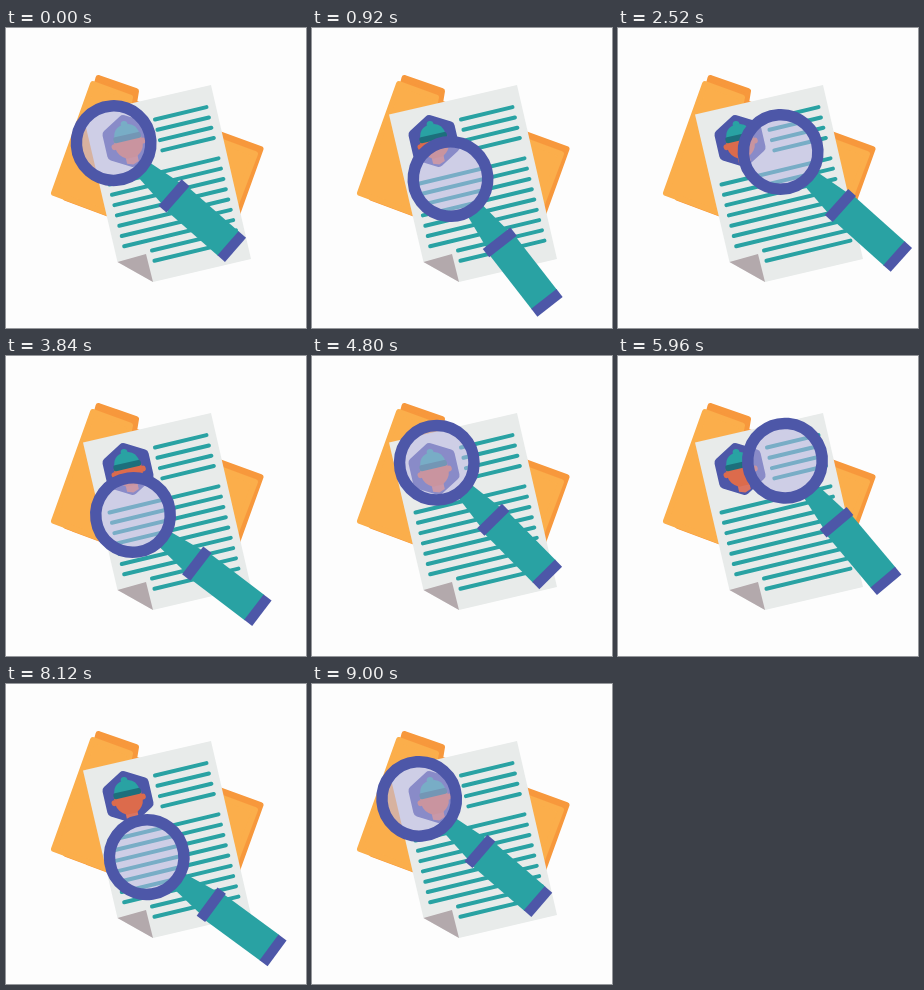
These frames come from a looping animation (300x300 px, 9.04 s). An HTML page:

```html
<!DOCTYPE html>
<html lang="en">
<head>
<meta charset="utf-8">
<title>Document search</title>
<style>
  html, body { margin: 0; height: 100%; overflow: hidden; background: #fdfdfd; }
  svg { display: block; width: 100vw; height: 100vh; }
  .navy { fill: #4d57a8; }
  .teal { fill: #29a2a3; }
  .round { stroke-width: 6; stroke-linejoin: round; }
</style>
</head>
<body>
<svg viewBox="0 0 300 300">
  <g class="round">
    <path d="M92.5 50 130 63 128 75 254.500 121 216 228 60 170Z" fill="#f7983c" stroke="#f7983c"/>
    <path d="M87 56 124 69.500 122 79 249 126 211 226 48 165Z" fill="#fbae4b" stroke="#fbae4b"/>
  </g>

  <path d="M77 86.500 205 57 245 231 147 254 111.500 234Z" fill="#e8ebea"/>
  <path d="M111.500 234 140 226 147 254Z" fill="#b3a9ac"/>
  <path id="lines" fill="none" stroke="#29a2a3" stroke-width="4" stroke-linecap="round"/>

  <g transform="translate(122 113) rotate(-13)">
    <path id="badge" class="navy" stroke="#4d57a8" stroke-width="10" stroke-linejoin="round"/>
    <path d="M-6 8H6V22L0 24-6 22Z" fill="#dc7460"/>
    <g fill="#dc6b4c">
      <circle cx="-14.500" cy="3" r="3"/>
      <circle cx="14.500" cy="3" r="3"/>
      <path d="M-14-3H14V5Q13 13 5 17H-5Q-13 13-14 5Z"/>
    </g>
    <circle class="teal" cy="-17" r="3.500"/>
    <path class="teal" d="M-13-4Q-12-17 0-17T13-4Z"/>
    <rect x="-14" y="-6.500" width="28" height="6" rx="2" fill="#1d6f7c"/>
  </g>

  <g id="glass">
    <path class="teal" d="M38-9 77-14V14L38 9Z"/>
    <path class="teal" d="M84-16H153V16H84Z"/>
    <path class="navy" d="M75-17.500H85.500V17.500H75Z"/>
    <path class="navy" d="M152-16H162V16H152Z"/>
    <circle r="34" fill="#bab7e3" fill-opacity=".55"/>
    <circle r="37.250" fill="none" stroke="#4d57a8" stroke-width="11.500"/>
  </g>
</svg>
<script>
  const LAP = 4520, STEP = 40;
  const byId = id => document.getElementById(id);

  // Text rows run parallel to the tilted top edge of the page.
  const rows = (count, x, y, width) => Array.from({ length: count },
    (_, i) => `M${x + 2.45 * i} ${y + 10.3 * i}l${width} ${-0.24 * width}`).join('');
  byId('lines').setAttribute('d',
    rows(4, 149, 91.5, 51.5) + rows(7, 103.5, 156.5, 109) + rows(2, 146, 222.5, 84));

  const corners = Array.from({ length: 6 }, (_, i) => {
    const a = (i + 0.5) * Math.PI / 3;
    return `${21.5 * Math.cos(a)} ${21.5 * Math.sin(a)}`;
  });
  byId('badge').setAttribute('d', `M${corners.join('L')}Z`);

  // Poses are [time in lap, lens x, lens y, handle angle].
  // Laps alternate between a low and a high first move, then share the rest.
  const firstMoves = [[920, 138.5, 151, 52.1], [860, 161, 104, 52]];
  const sharedMoves = [
    [2280, 162.5, 116.5, 43.4],
    [3400, 150, 176, 36.5],
    [3840, 127, 159, 37.3],
    [4460, 107, 115, 40.6]
  ];
  const keys = [-1, 0, 1, 2].flatMap(lap =>
    [firstMoves[lap & 1], ...sharedMoves].map(([t, ...p]) => [t + lap * LAP, ...p]));

  const slope = (i, c) =>
    (keys[i + 1][c] - keys[i - 1][c]) / (keys[i + 1][0] - keys[i - 1][0]);

  // Cubic Hermite curve through the neighbouring poses.
  function pose(time) {
    const j = keys.findIndex(k => k[0] > time), i = j - 1;
    const a = keys[i], b = keys[j], span = b[0] - a[0], u = (time - a[0]) / span, v = 1 - u;
    return [1, 2, 3].map(c =>
      a[c] * v * v * (1 + 2 * u) + b[c] * u * u * (1 + 2 * v) +
      span * u * v * (slope(i, c) * v - slope(j, c) * u));
  }

  const glass = byId('glass');
  const start = performance.now();
  function draw(now) {
    const elapsed = Math.max(0, now - start) % (2 * LAP);
    const [x, y, angle] = pose(Math.floor(elapsed / STEP) * STEP);
    glass.setAttribute('transform', `translate(${x} ${y}) rotate(${angle})`);
    requestAnimationFrame(draw);
  }
  draw(start);
</script>
</body>
</html>
```
